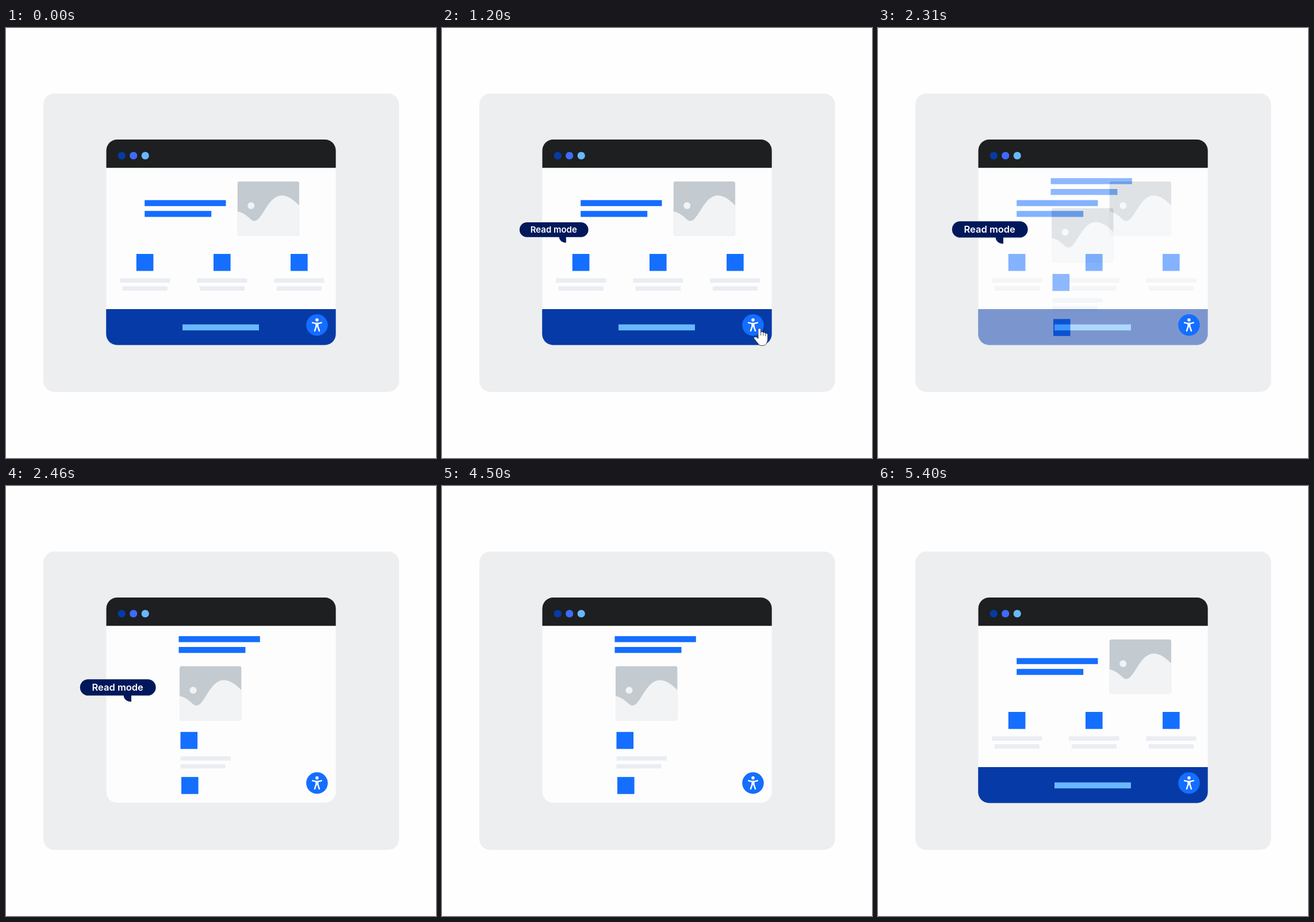
An HTML page for the animation above (6300 ms loop, 748 by 748 pixels).

```html
<!DOCTYPE html>
<html lang="en">
<head>
<meta charset="utf-8">
<title>Read mode</title>
<style>
  html, body { margin: 0; width: 100%; height: 100%; overflow: hidden; background: #fefefe; }
  svg { display: block; width: 100vw; height: 100vh; }

  .blue { fill: #146eff; }
  .navy { fill: #063aa6; }
  .sky { fill: #68b8ff; }
  .line { fill: #eaeef3; }
  .label { font: 600 16.5px Inter, "Open Sans", sans-serif; fill: #fff; text-anchor: middle; }

  .reader, .bubble, .cursor, .cursor-x, .cursor-y { animation: 6300ms linear infinite; }
  .reader { animation-name: reader; }
  .bubble { animation-name: bubble; transform-origin: 195px 356px; }
  .cursor { animation-name: cursor; }
  .cursor-x { animation-name: cursor-x; }
  .cursor-y { animation-name: cursor-y; }

  @keyframes reader {
    0%, 34.52% { opacity: 0; }
    39.05%, 81.43% { opacity: 1; }
    85.71%, 100% { opacity: 0; }
  }
  @keyframes bubble {
    0% { transform: scale(0); }
    13.65% { transform: scale(0); animation-timing-function: cubic-bezier(.16, 1, .3, 1); }
    29.52% { transform: scale(1); }
    61.9% { transform: scale(1); animation-timing-function: cubic-bezier(.32, 0, .67, 0); }
    71.43%, 100% { transform: scale(0); }
  }
  @keyframes cursor {
    0% { opacity: 0; }
    2.38%, 32.7% { opacity: 1; }
    34.76%, 100% { opacity: 0; }
  }
  /* Sine easings on the two axes trace a quarter ellipse */
  @keyframes cursor-x {
    0% { transform: translateX(94px); animation-timing-function: cubic-bezier(.47, 0, .745, .715); }
    9.52% { transform: none; }
    20.63% { transform: none; animation-timing-function: cubic-bezier(.39, .575, .565, 1); }
    34.6%, 100% { transform: translateX(94px); }
  }
  @keyframes cursor-y {
    0% { transform: translateY(122px); animation-timing-function: cubic-bezier(.39, .575, .565, 1); }
    9.52% { transform: none; }
    20.63% { transform: none; animation-timing-function: cubic-bezier(.47, 0, .745, .715); }
    34.6%, 100% { transform: translateY(122px); }
  }
</style>
</head>
<body>
<svg viewBox="0 0 748 748">
  <defs>
    <g id="headline" class="blue">
      <rect width="141.3" height="10.4"/>
      <rect y="18.8" width="116" height="10.4"/>
    </g>
    <clipPath id="frame"><rect width="107.7" height="94.3" rx="4"/></clipPath>
    <g id="picture" clip-path="url(#frame)">
      <rect width="108" height="95" fill="#c3cad0"/>
      <path fill="#f1f3f5" d="M0 52C11 54 19 62 24 66.5Q29.500 71 35.500 66C47 56 56 24.500 77.500 24.500C89 24.500 99 33 108 42V95H0Z"/>
      <circle cx="23.800" cy="42" r="6" fill="#f1f3f5"/>
    </g>
    <rect id="tile" class="blue" width="29.6" height="29.6"/>
    <g id="column">
      <use href="#tile" x="28.8"/>
      <rect class="line" y="42.4" width="87.3" height="7.6"/>
      <rect class="line" x="4.6" y="56.200" width="78.2" height="7.6"/>
    </g>
  </defs>

  <rect x="65" y="114" width="618.7" height="519" rx="19" fill="#edeef0"/>

  <g>
    <path fill="#fdfdfd" d="M174.500 243H573.700V489H174.500Z"/>
    <use href="#headline" x="241.2" y="299.400"/>
    <use href="#picture" x="402.5" y="267"/>
    <use href="#column" x="198" y="393"/>
    <use href="#column" x="332.2" y="393"/>
    <use href="#column" x="466.3" y="393"/>
    <path class="navy" d="M174.200 489H573.700V532.500A19 19 0 0 1 554.700 551.500H193.200A19 19 0 0 1 174.200 532.500Z"/>
    <rect class="sky" x="307" y="515.6" width="133" height="10.4"/>
  </g>

  <g class="reader">
    <rect x="172" y="243" width="404" height="311" fill="#edeef0"/>
    <path fill="#fdfdfd" d="M174.500 243H573.700V532A19 19 0 0 1 554.700 551H193.500A19 19 0 0 1 174.500 532Z"/>
    <use href="#headline" x="300.5" y="261.2"/>
    <use href="#picture" x="301.8" y="313.3"/>
    <use href="#tile" x="303.500" y="427.800"/>
    <rect class="line" x="303.5" y="470" width="87.300" height="7.6"/>
    <rect class="line" x="303.5" y="483.8" width="78.2" height="7.6"/>
    <use href="#tile" x="305" y="506.2"/>
  </g>

  <path fill="#1d1f20" d="M174.500 243.300V213A19 19 0 0 1 193.500 194H554.700A19 19 0 0 1 573.700 213V243.300Z"/>
  <circle class="navy" cx="201.200" cy="222" r="6.6"/>
  <circle cx="221.700" cy="222" r="6.6" fill="#3d6cff"/>
  <circle class="sky" cx="242.200" cy="222" r="6.6"/>

  <circle class="blue" cx="541" cy="516.7" r="18.8"/>
  <circle cx="541" cy="507.800" r="2.800" fill="#fff"/>
  <path d="M533.200 512.600Q541 515.400 548.800 512.600M539.600 514.500V519L537 526.800M542.400 514.500V519L545 526.800M539.800 518H542.200" fill="none" stroke="#fff" stroke-width="2.500" stroke-linecap="round" stroke-linejoin="round"/>

  <g class="bubble">
    <rect x="128.800" y="336.200" width="131.800" height="28.400" rx="14.200" fill="#00185a"/>
    <path fill="#00185a" d="M204.500 363.500H218V375.300C210 375 204.800 371 204.500 363.500Z"/>
    <text class="label" x="194.200" y="356.300">Read mode</text>
  </g>

  <g class="cursor"><g class="cursor-x"><g class="cursor-y">
    <g transform="translate(542 521.500)" stroke="#222" stroke-width=".8" stroke-linejoin="round" stroke-linecap="round">
      <path fill="#fff" d="M7.800 3.200Q7.800 .800 10.200 .800Q12.600 .800 12.600 3.200V7.200Q16 5.800 16.800 8.200Q20 7.200 20.600 9.600Q24.600 9 24.600 12V19C24.600 24 22.500 27.500 21 29Q19.500 31 16 31H13Q10.500 30.800 8.600 28.500L1 19Q0 17 1.500 16Q3.500 15 6 17L7.800 18.500Z"/>
      <path fill="none" d="M12.600 7V13M16.800 8.200V13.500M20.600 9.600V14"/>
    </g>
  </g></g></g>
</svg>
</body>
</html>
```
